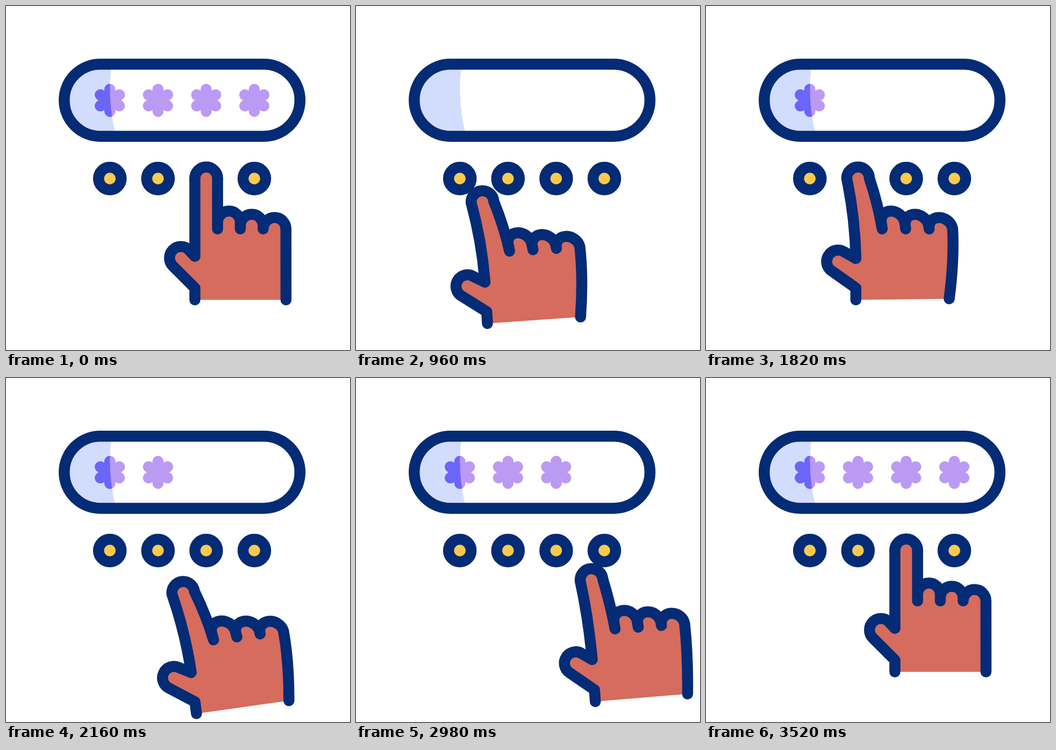
An HTML page that plays this animation: 640x640 px, repeating every 3.6 s.

```html
<!DOCTYPE html>
<html lang="en">
<head>
<meta charset="utf-8">
<title>Entering a code</title>
<style>
  html, body { margin: 0; width: 100%; height: 100%; overflow: hidden; background: #fff; }
  svg { display: block; width: 100vw; height: 100vh; }
  .line { stroke: #042b75; stroke-width: 20.5; stroke-linecap: round; stroke-linejoin: round; }
</style>
</head>
<body>
<svg viewBox="0 0 640 640">
  <defs>
    <path id="star" d="M0-20.5V20.5M-17.75-10.25 17.75 10.25M-17.75 10.25 17.75-10.25"
      fill="none" stroke-width="20.6" stroke-linecap="round"/>
    <path id="shade" d="M196.5 108.3Q187.2 175.5 205 242.5H175.4A67 67 0 0 1 175.4 108.3Z"/>
    <clipPath id="left"><use href="#shade"/></clipPath>
  </defs>
  <use href="#shade" fill="#d2ddfe"/>
  <g id="stars"></g>
  <rect class="line" x="108.3" y="108.2" width="438.6" height="134.2" rx="67.1" fill="none"/>
  <g id="dots"></g>
  <path id="hand" class="line" fill="#d56c5e"/>
</svg>
<script>
const LOOP = 3600, STEP = 680, FIRST = 1145;
const NS = 'http://www.w3.org/2000/svg';
const columns = [0, 1, 2, 3].map(i => 193.2 + 89.6 * i);
const pressTime = i => FIRST + STEP * i;
const clearTime = i => 160 + 140 * (3 - i);

const clamp = v => Math.max(0, Math.min(1, v));
const smooth = v => { v = clamp(v); return v * v * (3 - 2 * v); };
const ramp = (v, from, to) => smooth((v - from) / (to - from));

function add(parent, tag, attrs) {
  const el = document.createElementNS(NS, tag);
  for (const name in attrs) el.setAttribute(name, attrs[name]);
  return parent.appendChild(el);
}

const starBox = document.getElementById('stars');
const dotBox = document.getElementById('dots');
const hand = document.getElementById('hand');

const stars = columns.map((x, i) => {
  const g = add(starBox, 'g', {});
  const place = { href: '#star', transform: `translate(${x} 175.5)` };
  add(g, 'use', { ...place, stroke: '#bb9af4' });
  if (i === 0) {
    const dark = add(g, 'g', { 'clip-path': 'url(#left)' });
    add(dark, 'use', { ...place, stroke: '#6b65f9' });
  }
  return g;
});
const dots = columns.map(x =>
  add(dotBox, 'circle', { class: 'line', cx: x, cy: 321, fill: '#ffc94e' }));

// A hop drops away from one dot, pauses near halfway and rises to the next
function hop(u, mid) {
  return {
    along: mid * ramp(u, 0, 0.4) + (1 - mid) * ramp(u, 0.48, 1),
    dip: 79 * ramp(u, 0, 0.43) * (1 - ramp(u, 0.56, 1)),
    turn: 7.3 * ramp(u, 0, 0.3) * (1 - ramp(u, 0.5, 1))
  };
}

// The way back to rest is a short shallow arc
function settle(u) {
  const arc = Math.sin(Math.PI * u);
  return { along: u * (2 - u), dip: 20 * arc, turn: 4 * arc };
}

function poseAt(t) {
  const pose = {
    x: columns[2], y: 320.7, turn: 0,
    bend: ramp(t, 110, 880) * (1 - ramp(t, 2744, 3352))
  };
  const move = (dist, part) => {
    pose.x += dist * part.along;
    pose.y += part.dip;
    pose.turn += part.turn;
  };
  const gap = columns[1] - columns[0];
  move(-2 * gap, hop(clamp((t - 110) / 1010) ** 1.58, 0.46));
  for (let i = 0; i < 3; i++) move(gap, hop((t - pressTime(i) - 15) / 640, 0.52));
  move(-gap, settle(clamp((t - 3200) / 310)));
  return pose;
}

// Outline relative to the fingertip, made of cubic segments only
function outline(bend) {
  const wide = 42.4;
  const pts = [[-21, 226]];
  const line = (x, y) => {
    const [a, b] = pts[pts.length - 1];
    for (let k = 1; k < 4; k++) pts.push([a + (x - a) * k / 3, b + (y - b) * k / 3]);
  };
  const half = (x, y) => {
    const [a, b] = pts[pts.length - 1];
    const cx = (a + x) / 2, cy = (b + y) / 2;
    const vx = a - cx, vy = b - cy, wx = -vy, wy = vx, k = 0.5523;
    pts.push([a + k * wx, b + k * wy], [cx + wx + k * vx, cy + wy + k * vy],
      [cx + wx, cy + wy], [cx + wx - k * vx, cy + wy - k * vy],
      [x + k * wx, y + k * wy], [x, y]);
  };
  const thumb = (x, y) => {
    const r = bend * 0.21, dx = x + 21, dy = y - 204;
    return [-21 + dx * Math.cos(r) + dy * Math.sin(r) + 4 * bend,
      204 - dx * Math.sin(r) + dy * Math.cos(r)];
  };
  line(-21, 204);
  line(...thumb(-62, 163));
  half(...thumb(-32, 133));
  line(-21, 145 + 4 * bend);
  line(-21, 0);
  half(21.2, 0);
  for (let i = 0; i < 3; i++) {
    const x = 21.2 + wide * i, top = 82 + 6 * i;
    line(x, 94);
    line(x, Math.min(top, 94));
    half(x + wide, Math.min(top, 94));
  }
  line(148.5, 226 - 2 * bend);
  return pts;
}

function handPath({ x: tx, y: ty, bend, turn }) {
  const r = turn * Math.PI / 180, cos = Math.cos(r), sin = Math.sin(r);
  const pts = outline(bend).map(([x, y]) => {
    const h = Math.max(0, y);
    let shift = 17 * (1 - (1 - Math.min(1, h / 130)) ** 2);
    if (x > 0) shift += (8 + x / 30) * Math.sin(Math.PI * h / 250);
    x += bend * shift;
    return (tx + x * cos + y * sin).toFixed(2) + ' ' + (ty - x * sin + y * cos).toFixed(2);
  });
  return 'M' + pts[0] + 'C' + pts.slice(1).join(' ');
}

function draw(t) {
  stars.forEach((el, i) => {
    const shown = clamp((t - pressTime(i)) / 70);
    const kept = 1 - clamp((t - clearTime(i)) / 100);
    el.setAttribute('opacity', Math.max(shown, kept));
  });
  dots.forEach((el, i) => {
    const d = t - pressTime(i);
    el.setAttribute('r', 21 * (1 - 0.5 * ramp(d, -25, 55) * (1 - ramp(d, 75, 295))));
  });
  hand.setAttribute('d', handPath(poseAt(t)));
}

function tick() {
  draw(performance.now() % LOOP);
  requestAnimationFrame(tick);
}
tick();
</script>
</body>
</html>
```
